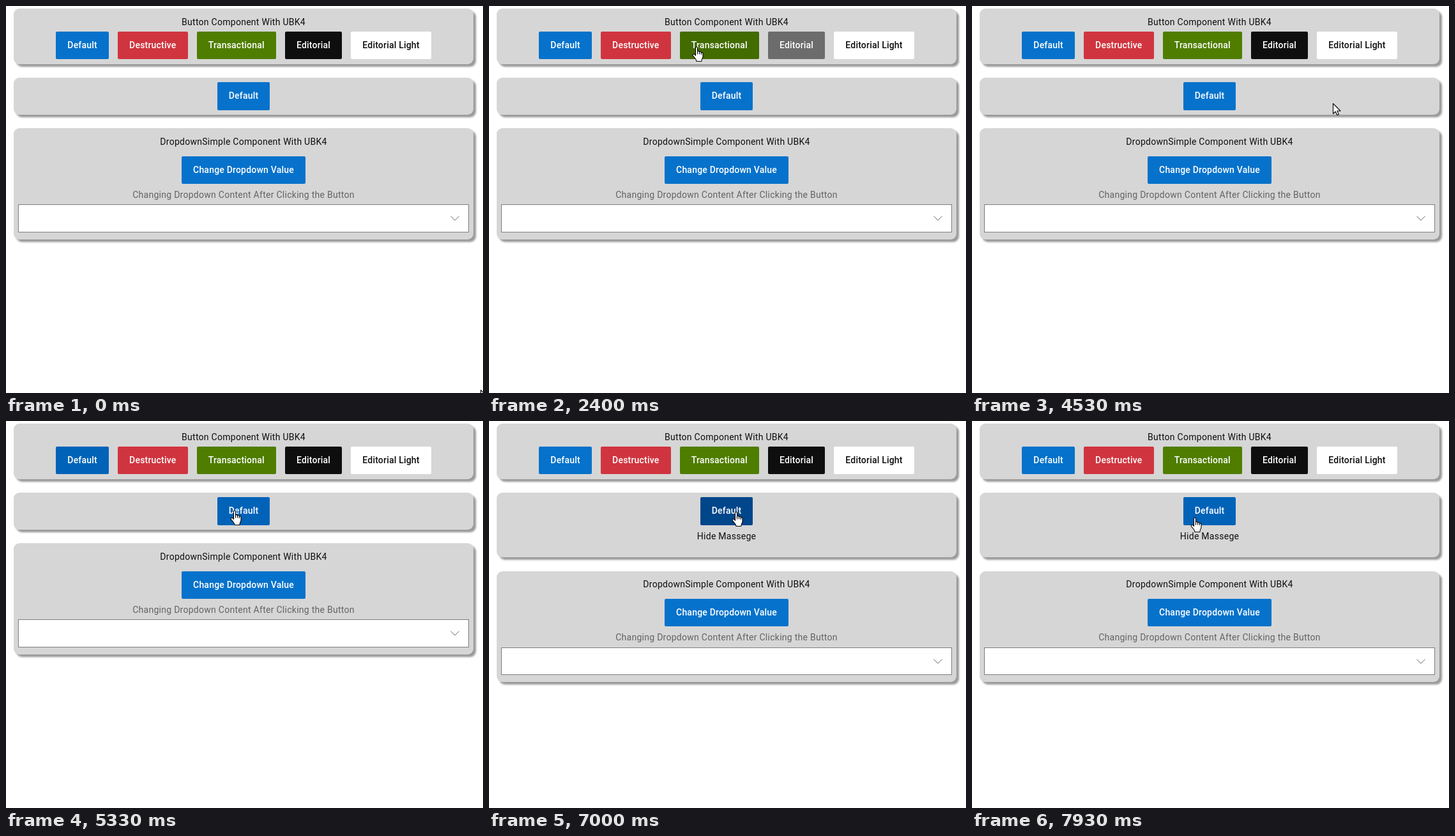
Write an HTML page that moves like this. It is 747 by 605 pixels and loops after 8000 ms.

```html
<!DOCTYPE html>
<html lang="en">
<head>
<meta charset="utf-8">
<title>Component demo</title>
<style>
html, body { margin: 0; width: 100%; height: 100%; overflow: hidden; background: #fff; }
body { position: relative; font: 14px Roboto, Arial, sans-serif; color: #0e0e0e; cursor: default; }
main { position: absolute; top: 4.2px; left: 12px; width: 720px; display: flex; flex-direction: column; gap: 21.2px; }
section { box-sizing: border-box; padding-top: 10.8px; background: #d6d6d6; border-radius: 9px; box-shadow: 4px 4px 3px #999; }
.bar { height: 86.8px; }
.reveal { height: 57.8px; padding-top: 7.2px; }
.reveal.open { height: 101.2px; }
.form { height: 173.6px; }

p { width: fit-content; margin: 0 auto; line-height: 20px; letter-spacing: .27px; white-space: nowrap; }
.reveal p { margin-top: 7.4px; visibility: hidden; }
.reveal.open p { visibility: visible; }
.form .hint { margin-top: 7px; color: #636363; }

.row { display: flex; justify-content: center; gap: 14.2px; }
.bar .row { margin-top: 5.2px; }
.form .row { margin-top: 12.8px; }

.button { height: 43.2px; padding: 0 18px; border-radius: 2px; line-height: 42px; font-weight: 500; letter-spacing: .2px;
  white-space: nowrap; color: #fff; background: #0672cb; }
.button.hover { background: #0063b8; }
.button.pressed { background: #00468b; }
.red { background: #d0353f; }
.red.hover { background: #bb2a33; }
.green { background: #4f7d00; }
.green.hover { background: #426b00; }
.black { background: #0e0e0e; }
.black.hover { background: #6c6c6c; }
.white { background: #fff; color: #0e0e0e; }
.white.hover { background: #f0f0f0; }

.select { box-sizing: border-box; position: relative; margin: 5.2px 7px 0; height: 43.4px; background: #fff; border: 1px solid #7e7e7e; }
.select.hover { border-color: #0063b8; }
.select svg { position: absolute; left: 675px; top: 16px; }
.select path { fill: none; stroke: #6e6e6e; }

svg { overflow: visible; }
#pointer { position: absolute; left: 0; top: 0; width: 20px; height: 26px; }
#pointer path { fill: #fff; stroke: #000; stroke-width: 1.1; stroke-linejoin: round; }
#pointer .line { fill: none; }
</style>
</head>
<body>
<main>
  <section class="bar">
    <p>Button Component With UBK4</p>
    <div class="row">
      <div class="button" id="first">Default</div>
      <div class="button red" id="red">Destructive</div>
      <div class="button green" id="green">Transactional</div>
      <div class="button black" id="black">Editorial</div>
      <div class="button white" id="white">Editorial Light</div>
    </div>
  </section>
  <section class="reveal" id="reveal">
    <div class="row"><div class="button" id="toggle">Default</div></div>
    <p>Hide Massege</p>
  </section>
  <section class="form">
    <p>DropdownSimple Component With UBK4</p>
    <div class="row"><div class="button">Change Dropdown Value</div></div>
    <p class="hint">Changing Dropdown Content After Clicking the Button</p>
    <div class="select"><svg width="16" height="10"><path d="M1.5 1.5L8 8L14.5 1.5"/></svg></div>
  </section>
</main>
<svg id="pointer">
  <path id="arrow" d="M.5 .5V16.5L4.3 13L6.8 18.5L9.3 17.4L6.9 12H12Z"/>
  <g id="hand">
    <path d="M-1.5 12.5V1.5Q-1.5 0 0 0T1.5 1.5V7Q1.6 6.5 2.9 6.6Q4.4 6.7 4.5 8Q4.6 7.4 5.8 7.5Q7.3 7.7 7.3 9Q7.5 8.4 8.5 8.6Q10 9 10 10.5V15Q10 17 8.5 19L7.8 22.5H0Q-.2 20.2 -2 18L-5.5 13.8Q-6.5 12.2 -5.3 11.4Q-4 10.8 -2.8 12L-1.5 13.5Z"/>
    <path class="line" d="M1.5 7V11.5M4.5 8V11.5M7.3 9V12"/>
  </g>
  <path id="beam" class="line" d="M-3.5 -7.5H-1L0 -6.5L1 -7.5H3.5M0 -6.5V6.5M-3.5 7.5H-1L0 6.5L1 7.5H3.5"/>
</svg>
<script>
const LOOP = 8000, STEP = 1000 / 15, HOLD = 200;
const LAST = Math.floor(LOOP / STEP) - 1;
const find = id => document.getElementById(id);
const pointer = find('pointer'), reveal = find('reveal'), toggle = find('toggle');
const shapes = ['arrow', 'hand', 'beam'].map(find);
const controls = [...document.querySelectorAll('.button, .select')];
const labels = [...document.querySelectorAll('p')];

// Where the pointer is headed: time, then a control's id or a point.
const stops = [
  [0, 743, 600], [600, 'first'], [860, 'green'], [1000, 366, 70], [1400, 'white'], [1600, 'white'],
  [2130, 'black'], [2335, 'black'], [2400, 325, 64], [2730, 'red'], [2870, 'red'],
  [3130, 'first'], [3335, 'first'], [3400, 345, 27], [4070, 465, 34], [4400, 648, 164],
  [4930, 125, 90], [5100, 'first'], [5270, 'first'], [5330, 358, 140], [5530, 436, 150],
  [5730, 'toggle'], [6670, 'toggle'], [7000, 387, 142], [7470, 387, 142], [7860, 350, 150], [7930, 309, 175]
];

// Mouse releases; each one shows or hides the message.
const clicks = [6000, 6400, 6730, 7130, 7600];

function spot([, x, y]) {
  if (typeof x === 'number') return [x, y];
  const r = find(x).getBoundingClientRect();
  return [r.left + r.width / 2, r.top + r.height / 2];
}

function position(t) {
  const i = stops.findIndex(s => s[0] > t);
  if (i < 0) return spot(stops[stops.length - 1]);
  const a = stops[i - 1], b = stops[i];
  const f = (t - a[0]) / (b[0] - a[0]);
  const ease = f * f * (3 - 2 * f);
  const from = spot(a), to = spot(b);
  return from.map((v, n) => v + (to[n] - v) * ease);
}

function inside(el, [x, y]) {
  const r = el.getBoundingClientRect();
  return x >= r.left && x < r.right && y >= r.top && y < r.bottom;
}

function draw(t) {
  const open = clicks.filter(c => t >= c).length % 2 === 1;
  reveal.classList.toggle('open', open);
  toggle.classList.toggle('pressed', clicks.some(c => t >= c - HOLD && t < c));

  // Hover lags the pointer by one step when it leaves.
  const now = position(t), before = position(Math.max(0, t - STEP));
  for (const el of controls) el.classList.toggle('hover', inside(el, now) || inside(el, before));

  const onText = labels.some(el => inside(el, now) && (open || el.parentNode !== reveal));
  const shape = controls.some(el => inside(el, now)) ? 1 : onText ? 2 : 0;
  shapes.forEach((s, i) => s.style.display = i === shape ? '' : 'none');
  const [x, y] = now.map(Math.round);
  pointer.style.transform = `translate(${x}px, ${y}px)`;
}

const start = performance.now();
let shown = -1;
function tick() {
  const t = (performance.now() - start) % LOOP;
  const step = Math.min(LAST, Math.floor((t + 3.5) / STEP));
  if (step !== shown) draw((shown = step) * STEP);
  requestAnimationFrame(tick);
}
tick();
</script>
</body>
</html>
```
